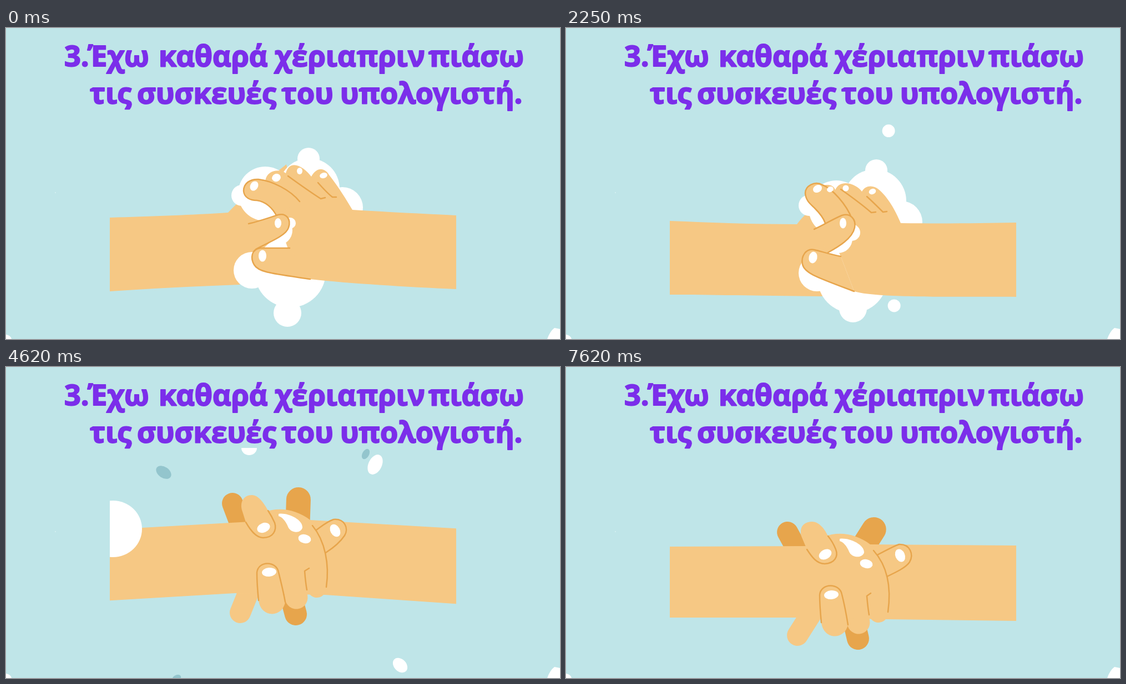
An HTML page with a canvas for the animation above (7.65 s loop, 998x561 px).

```html
<!DOCTYPE html>
<html lang="el">
<head>
<meta charset="utf-8">
<style>
  html, body { margin: 0; width: 100%; height: 100%; overflow: hidden; background: #bfe5e8; }
  canvas, svg { position: absolute; left: 0; top: 0; }
  text { font: 700 52px "Open Sans", "Noto Sans", sans-serif; fill: #7b2eea; stroke: #7b2eea; stroke-width: 2; stroke-linejoin: round; }
</style>
</head>
<body>
<canvas width="998" height="561"></canvas>
<svg width="998" height="561">
  <path fill="#fff" d="M0 553Q8 554 10 561H0ZM975 561Q980 547 988 541L998 543V561Z"/>
  <circle cx="89" cy="297" r="1" fill="#d8f0f2"/>
  <text y="69"><tspan x="105">3.Έχω</tspan> <tspan x="275">καθαρά</tspan> <tspan x="484">χέρια</tspan> <tspan x="632">πριν</tspan> <tspan x="761">πιάσω</tspan></text>
  <text y="136"><tspan x="151">τις</tspan> <tspan x="236">συσκευές</tspan> <tspan x="496">του</tspan> <tspan x="602">υπολογιστή.</tspan></text>
</svg>
<script>
const ctx = document.querySelector('canvas').getContext('2d');
const SKIN = '#f6c884', SHADE = '#e7a54c', WHITE = '#fff', TEAL = '#93c5cd', BG = '#bfe5e8';
const LOOP = 7650, STEP = 30, RUB = 540, BURST = 4350, TAU = Math.PI * 2;
const clamp = x => Math.min(1, Math.max(0, x));
const smooth = x => (x = clamp(x)) * x * (3 - 2 * x);

// Blends equally built number strings by a list of weights
function morph(...poses) {
  const num = /-?[\d.]+/g;
  const nums = poses.map(p => p.match(num).map(Number));
  const parts = poses[0].split(num);
  const value = (w, i) => nums.reduce((sum, n, j) => sum + w[j] * n[i], 0).toFixed(2);
  return w => parts.reduce((s, part, i) => s + (i ? value(w, i - 1) : '') + part, '');
}
function fill(d, color) {
  ctx.fillStyle = color;
  ctx.fill(new Path2D(d));
}
function line(d, color = SHADE, width = 2.5) {
  ctx.strokeStyle = color;
  ctx.lineWidth = width;
  ctx.stroke(new Path2D(d));
}
function oval(x, y, rx, ry = rx, turn = 0, color = WHITE) {
  ctx.fillStyle = color;
  ctx.beginPath();
  ctx.ellipse(x, y, Math.abs(rx), Math.abs(ry), turn, 0, TAU);
  ctx.fill();
}
function ovals(text, size) {
  const n = text.trim().split(/\s+/).map(Number);
  for (let i = 0; i < n.length; i += size) oval(...n.slice(i, i + size));
}

// Soapy hands: raised, lowered and in between
const soapy = {
  leftArm: morph(
    'M187 342C260 340 340 337 400 333C420 312 435 300 450 290L505 246L540 400L420 463C340 466 260 470 187 475Z',
    'M187 348C260 351 340 355 395 356C415 345 430 340 450 335L500 330L540 430L425 487C340 484 260 482 187 481Z',
    'M187 348C260 351 340 354 416 354C425 342 432 335 440 330L500 300L540 420L461 484C340 483 260 481 187 481Z'),
  foam: morph(
    '546 290 55 545 236 20 467 299 49 425 302 19 606 324 37 512 440 64 443 437 33 507 514 25',
    '552 333 56 547 280 20 468 327 49 422 342 17 600 370 38 518 466 64 453 469 33 511 533 25',
    '556 312 57 559 257 20 487 325 50 438 320 19 604 350 38 516 451 63 452 442 33 517 506 25'),
  rightArm: morph(
    'M811 338C750 335 690 332 624 328C612 308 600 288 582 265C574 252 560 250 550 268C538 252 512 234 504 262C495 254 470 255 467 276C448 268 428 276 428 294C429 306 440 311 452 311C468 313 480 325 487 338L508 398L548 453C620 461 720 467 811 471Z',
    'M811 348C750 350 690 352 598 352C586 333 560 313 530 312C522 312 512 315 505 317C492 316 475 320 462 322C450 324 440 328 433 332C415 336 393 340 393 358C393 370 402 377 410 377C430 372 450 370 463 382L515 430L547 485C620 485 720 483 811 482Z',
    'M811 351C750 352 690 353 603 352C594 330 580 305 563 291C555 284 540 282 533 295C525 283 495 270 485 292C482 282 470 282 464 284C455 276 431 278 431 300C432 313 441 318 448 325C458 335 464 343 467 352L495 412L519 475C560 488 720 484 811 485Z'),
  index: morph(
    'M529 313C512 292 480 276 455 273C440 272 428 280 428 294C429 306 440 311 452 311C468 313 480 325 487 338',
    'M499 350C480 336 455 333 425 338C408 340 393 345 393 358C393 370 402 378 412 377C430 372 450 371 463 382',
    'M515 344C505 318 480 290 462 283C448 275 431 285 431 298C432 312 441 318 448 325C458 335 464 343 467 352'),
  creases: morph(
    'M508 267C530 283 550 297 567 308L575 306M562 279C570 288 580 299 588 305L595 305',
    'M462 322C490 321 515 329 537 339L545 335M517 319C530 323 545 328 557 332L563 329',
    'M495 291C515 305 535 320 550 333L558 332M542 304C552 313 562 323 571 332L578 331'),
  palmFoam: morph('489 365 27 512 352 10', '487 394 26 515 390 14', '490 380 26 515 369 15'),
  thumb: morph(
    'M437 353C455 349 475 342 490 337C505 333 514 345 509 360C505 375 470 388 450 399',
    'M460 386C475 387 495 388 512 389C527 390 531 402 527 413C522 428 510 434 452 434',
    'M447 363C465 355 480 345 497 338C512 333 523 345 520 360C516 380 490 395 472 405'),
  lowFinger: morph(
    'M511 397C495 397 475 397 458 397C442 399 440 415 447 427C455 441 480 443 548 453',
    'M502 434C485 436 470 437 455 440C440 443 436 455 440 467C446 482 460 485 547 485',
    'M495 412C475 408 460 403 447 400C432 397 423 412 426 426C429 442 450 449 519 475'),
  nails: morph(
    '447 285 7 9 .5 487 270 8 7 -.4 529 258 5 6 0 572 266 7 5 -.3 490 352 6 9 0 462 411 7 10.5 0',
    '409 352 7 9 .4 447 330 4 1.5 -.2 515 318 4 2 0 560 330 0 0 0 509 403 6 9.5 .2 456 455 7 10.5 0',
    '453 290 8.5 6.5 -.5 476 291 6 5 -.4 504 289 5.5 5.5 0 552 295 6.5 5 -.4 499 352 6 9.5 0 445 414 7.5 10.5 .2')
};

function drawSoapy(t) {
  const a = t / RUB * TAU, c = Math.cos(a) / 2, q = Math.sin(a) / Math.sin(TAU / 6);
  const w = [.5 + c - .75 * q, .5 - c - .25 * q, q];
  const at = name => soapy[name](w);
  fill(at('leftArm'), SKIN);
  ovals(at('foam'), 3);
  fill(at('rightArm'), SKIN);
  fill(at('index'), SKIN);
  line(at('index'));
  line(at('creases'));
  ovals(at('palmFoam'), 3);
  for (const name of ['thumb', 'lowFinger']) {
    fill(at(name), SKIN);
    line(at(name));
  }
  ovals(at('nails'), 5);
}

// Clean, interlocked hands: two ends of the finger swing
const clean = {
  backLeft: morph('M425 335L408 290', 'M422 340L399 298'),
  backRight: morph('M525 340L527 283', 'M525 340L555 293'),
  backLow: morph('M514 460L522 490', 'M519 460L526 490'),
  lowLeft: morph('M441 440L422 487', 'M445 440L417 484'),
  lowThird: morph('M518 430L523 460', 'M522 430L527 461'),
  lowFourth: morph('M557 420L560 443', 'M560 420L563 444'),
  middle: morph(
    'M455 465C453 445 452 430 452 415C454 393 487 393 491 414C496 435 500 450 503 468',
    'M460 461C458 440 457 425 457 411C459 389 493 389 497 410C502 430 505 446 508 465'),
  middleTip: morph('C498 497 459 497 455 465', 'C502 493 464 493 460 461'),
  creases: morph(
    'M546 407L538 412C539 425 540 435 542 446M552 330C575 358 583 400 577 441',
    'M549 408L542 413C543 425 544 435 546 447M554 331C580 360 586 400 580 442'),
  rightThumb: morph(
    'M559 338C570 330 580 322 590 319C610 317 618 335 610 348C602 360 590 370 576 379',
    'M561 339C575 332 588 324 600 320C620 319 627 338 619 352C612 362 595 370 578 378'),
  leftThumb: morph(
    'M432 324C440 338 450 352 463 352C482 352 488 338 484 325C480 316 476 309 472 303',
    'M434 329C443 343 452 355 466 355C484 354 491 342 486 329C482 319 477 311 472 305'),
  leftThumbTop: morph('C465 290 455 275 443 275C428 275 420 288 426 305Z', 'C466 292 456 279 443 279C426 279 418 293 426 310Z'),
  shine: morph(
    'M491 309C505 306 535 318 534 334C530 346 512 343 508 332C504 322 497 314 491 313Z',
    'M493 310C507 307 538 319 537 335C533 346 514 344 510 333C506 323 499 315 493 314Z'),
  nails: morph(
    '593 339 8.5 12 -.5 464 334 12 8.5 -.4 474 414 13 8 -.1 538 354 11.5 8 .2',
    '602 340 8.5 12 -.4 467 338 12 8.5 -.5 478 411 13 8 -.1 541 355 11.5 8 .2')
};

function drawClean(t) {
  const s = .42 - .66 * Math.cos((t - 5850) / RUB * TAU + .87);
  const at = name => clean[name]([1 - s, s]);
  const lift = -44 * (1 - smooth((t - 4620) / 700)), end = -.3 * lift;
  ctx.save();
  ctx.translate(0, lift);
  line(at('backLeft'), SHADE, 38);
  line(at('backRight'), SHADE, 44);
  line(at('backLow'), SHADE, 40);
  line(at('lowLeft'), SKIN, 38);
  line(at('lowThird'), SKIN, 41);
  line(at('lowFourth'), SKIN, 34);
  fill(`M187 ${324 + end}L440 323C470 293 515 295 548 320L811 ${322 + end}V${458 + end}L575 455L412 452L187 ${452 + end}Z`, SKIN);
  fill(at('middle') + at('middleTip'), SKIN);
  line(at('middle'));
  fill(at('rightThumb'), SKIN);
  line(at('rightThumb'));
  line(at('creases'));
  fill(at('leftThumb') + at('leftThumbTop'), SKIN);
  line(at('leftThumb'));
  fill(at('shine'), WHITE);
  ovals(at('nails'), 5);
  ctx.restore();
}

const CLOUD_X = 505, CLOUD_Y = 380;
const shadows = [[518, 195, 35], [584, 234, 66], [421, 485, 66], [601, 470, 91]];
const puffs = [[470, 293, 122], [584, 247, 40], [617, 308, 78], [353, 371, 65], [343, 310, 22], [661, 393, 62],
  [645, 466, 31], [367, 439, 28], [405, 465, 35], [508, 437, 127], [500, 380, 140]];
const folds = 'M400 289C415 284 440 287 455 304M440 288C447 265 475 250 505 256M599 253C606 268 609 287 605 306' +
  'M583 318C600 305 620 303 644 317M515 409C519 425 510 440 487 449M492 449C492 475 485 508 451 508M613 456C609 467 611 478 620 487';

function inCloud(t, draw) {
  const k = clamp((t - 2850) / 650);
  const size = smooth(k) * (1 + .015 * Math.sin((t - 3810) / RUB * TAU));
  if (!size) return;
  ctx.save();
  ctx.translate(CLOUD_X, CLOUD_Y);
  ctx.scale(size, size);
  ctx.translate(-CLOUD_X, -CLOUD_Y);
  draw();
  ctx.restore();
}
const puff = (list, color) => list.forEach(([x, y, r]) => oval(x, y, r, r, 0, color));

// Splashes: x, y, rx, ry, turn, colour at the moment the burst has gone one full reach
const drops = [[193, 292, 52, 51, 0, WHITE], [438, 146, 14, 13, 0, WHITE], [284, 190, 15, 10, .6, TEAL],
  [665, 176, 12, 19, .45, WHITE], [648, 157, 6, 10, .5, TEAL], [710, 538, 15, 11, .8, WHITE], [307, 562, 9, 6, -.6, TEAL]];

function drawBurst(t) {
  const k = (t - BURST) / 210, reach = (t - BURST) / 270;
  if (k < 1) for (const [x, y, r] of puffs) {
    oval(CLOUD_X + (x - CLOUD_X) * (1 + 1.6 * k), CLOUD_Y + (y - CLOUD_Y) * (1 + 1.6 * k), r * (1 - k));
  }
  if (reach < 4) for (const [x, y, ...shape] of drops) {
    oval(CLOUD_X + (x - CLOUD_X) * reach, CLOUD_Y + (y - CLOUD_Y) * reach, ...shape);
  }
}

// Loose bubbles: start, end, from x, y, to x, y, radius
const bubbles = [[700, 1260, 450, 320, 367, 204, 12], [1050, 1550, 460, 450, 383, 575, 11.5], [1800, 2300, 555, 290, 584, 174, 11.5],
  [2100, 2500, 560, 460, 643, 569, 11.5], [2400, 2900, 620, 330, 690, 184, 11.5], [3600, 4000, 390, 330, 257, 189, 12],
  [3700, 3900, 390, 480, 332, 540, 2.5]];

function drawBubbles(t) {
  for (const [start, end, x, y, toX, toY, r] of bubbles) {
    const k = (t - start) / (end - start), pop = (t - end) / 150;
    if (k >= 0 && k < 1) oval(x + (toX - x) * k, y + (toY - y) * k, r);
    else if (r > 3 && pop >= 0 && pop < 1) {
      for (let i = 0; i < 4; i++) {
        const a = -.25 + i * TAU / 4, d = 12 + 35 * pop;
        oval(toX + d * Math.cos(a), toY + d * Math.sin(a), 2.5);
      }
    }
  }
}

function render(t) {
  ctx.fillStyle = BG;
  ctx.fillRect(0, 0, 998, 561);
  ctx.save();
  ctx.beginPath();
  ctx.rect(187, 146, 624, 415);
  ctx.clip();
  ctx.lineCap = ctx.lineJoin = 'round';
  if (t < BURST) {
    inCloud(t, () => puff(shadows, TEAL));
    drawBubbles(t);
    drawSoapy(t);
    inCloud(t, () => {
      puff(puffs, WHITE);
      line(folds, BG, 3);
    });
  } else {
    drawClean(t);
    drawBurst(t);
  }
  ctx.restore();
}

const begin = performance.now();
function tick() {
  const t = (performance.now() - begin) % LOOP;
  render(Math.floor(t / STEP) * STEP);
  requestAnimationFrame(tick);
}
tick();
</script>
</body>
</html>
```
